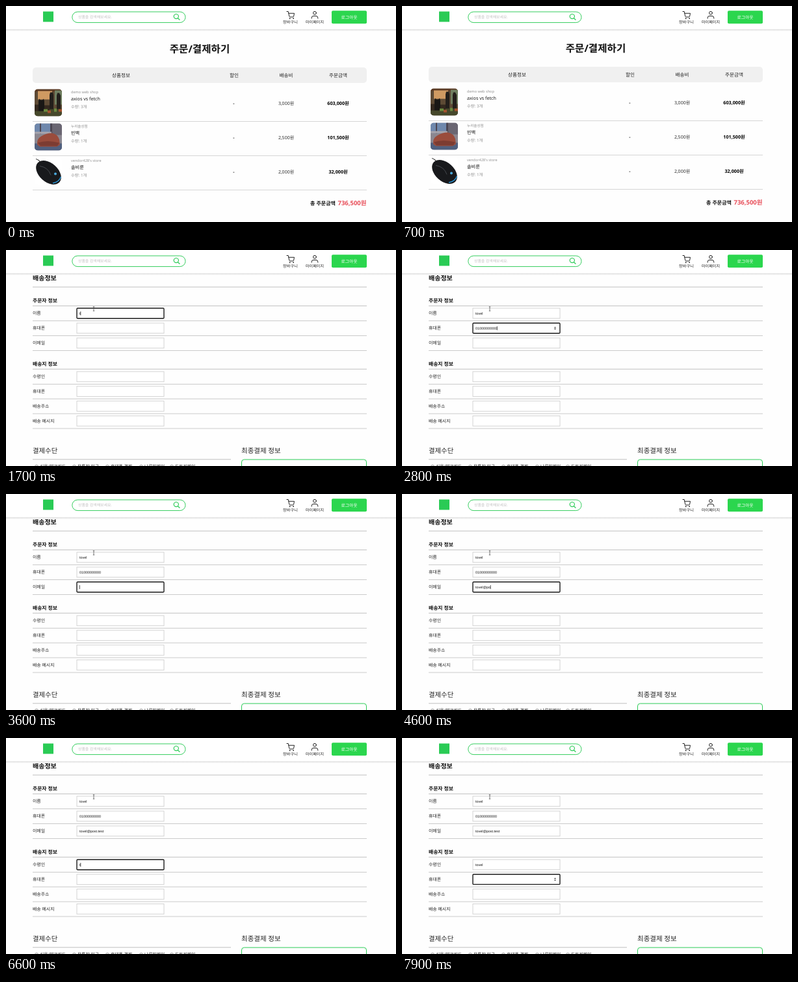
An HTML page that plays this animation: 600x334 px, repeating every 8 s.

```html
<!DOCTYPE html>
<html lang="ko">
<head>
<meta charset="utf-8">
<title>주문/결제하기</title>
<style>
  html, body { margin: 0; width: 100%; height: 100%; overflow: hidden; background: #fefefe; }
  svg { display: block; width: 600px; height: 334px; }
  text { font-family: "Open Sans", "Noto Sans CJK KR", "Noto Sans CJK", sans-serif; text-rendering: geometricPrecision; white-space: pre; }
  .typed { font-family: "Liberation Sans", Arial, sans-serif; }
  .icon { fill: none; stroke: #222; stroke-linecap: round; stroke-linejoin: round; }
</style>
</head>
<body>
<svg id="stage" viewBox="0 0 600 334"></svg>
<script>
const LOOP = 8000, SCROLL = 328;
const GREEN = '#2acb55';

// Markup helpers; y is the vertical middle of the glyphs.
const text = (x, y, str, size, { fill = '#222', weight = 400, anchor = 'start' } = {}) =>
  `<text x="${x}" y="${y + size * 0.36}" font-size="${size}" fill="${fill}" font-weight="${weight}" text-anchor="${anchor}">${str}</text>`;
const centered = (x, y, str, size, options = {}) => text(x, y, str, size, { ...options, anchor: 'middle' });
const rule = (y, width = 0.6, x2 = 555) =>
  `<path d="M41 ${y}H${x2}" stroke="#bdbdbd" stroke-width="${width}"/>`;

const products = [
  { store: 'demo web shop', name: 'axios vs fetch', count: 3, shipping: '3,000', price: '603,000' },
  { store: '누리솔상점', name: '빈백', count: 1, shipping: '2,500', price: '101,500' },
  { store: "vendor428's store", name: '솔비룬', count: 1, shipping: '2,000', price: '32,000' },
];

const thumbnails = [
  `<rect width="42" height="42" fill="#5d4a35"/>
   <path d="M0 0h42v4H0z" fill="#5b3a24"/>
   <path d="M5 3h22v13H5z" fill="#cf9a62"/>
   <path d="M31 2h11v22H31z" fill="#6f7f60"/>
   <path d="M0 30h42v12H0z" fill="#46482b"/>
   <path d="M6 34V19l1-4 2 2h3l2-2 1 4v15z" fill="#191715"/>
   <path d="M23 31V9l1-4h4l1 4v22zM34 31V10l1-4h3l2 4v21z" fill="#231f1b"/>
   <path d="M0 24h6v10H0zM15 25h8v8h-8z" fill="#33281e"/>
   <path d="M14 31h6v4h-6zM30 30h4v5h-4z" fill="#6b8a3e"/>
   <path d="M20 33h5v4h-5zM37 31h5v4h-5z" fill="#a5532f"/>`,
  `<rect width="42" height="42" fill="#8b8790"/>
   <path d="M0 0h26v16H0z" fill="#6f88ac"/>
   <path d="M26 0h16v18H26z" fill="#6a6672"/>
   <path d="M8 0h2v16H8zM24 0h3v18h-3z" fill="#4c4652"/>
   <path d="M0 13h26v3H0z" fill="#a9a5ac"/>
   <path d="M0 31h42v11H0z" fill="#50607f"/>
   <path d="M4 33q-1-9 6-13 8-5 16-5 9 1 12 10l1 8-5 3H8z" fill="#9a4c3c"/>
   <path d="M5 30q14-5 33 0l-3 5H9z" fill="#7c3c32"/>`,
  `<rect width="42" height="42" fill="#fff"/>
   <path d="M2 2q5 1 9 8" fill="none" stroke="#333" stroke-width="1.2"/>
   <ellipse cx="21.5" cy="23" rx="22.5" ry="14.5" transform="rotate(42 21.5 23)" fill="#18191c"/>
   <path d="M8 13q13 2 17 14" fill="none" stroke="#44474c"/>
   <path d="M28 39.5q10-2 12.5-10" fill="none" stroke="#2d9ee0" stroke-width="1.3"/>
   <circle cx="32" cy="25" r="2" fill="#4aa9dd"/>`,
];

const productRow = (product, i) => {
  const y = 150 + i * 53;
  const gray = { fill: '#8c8c8c' };
  return `<svg x="44" y="${y - 21.5}" width="42" height="42"><g clip-path="url(#thumb)">${thumbnails[i]}</g></svg>`
    + text(100, y - 17.5, product.store, 5.6, gray)
    + text(100, y - 6.6, product.name, 7.2, { fill: '#111' })
    + text(100, y + 5.4, `수량: ${product.count}개`, 6.3, gray)
    + centered(350.5, y, '-', 7, { weight: 700 })
    + centered(431, y, product.shipping + '원', 7)
    + centered(511, y, product.price + '원', 7.2, { weight: 700, fill: '#000' })
    + rule(y + 28.5);
};

// Form fields; keys start at `start`, one every `step` ms.
const fields = [
  { label: '이름', y: 98, value: 'tovel', focus: 1500, start: 1700, step: 90 },
  { label: '휴대폰', y: 121, value: '01000000000', focus: 2250, start: 2300, step: 42, numeric: true },
  { label: '이메일', y: 144, value: 'tovel@post.test', focus: 3200, start: 3700, step: 125 },
  { label: '수령인', y: 196, value: 'tovel', focus: 5850, start: 6580, step: 125 },
  { label: '휴대폰', y: 218.7, value: '', focus: 7380, start: 7380, step: 125, numeric: true },
  { label: '배송주소', y: 241.6, value: '', focus: Infinity },
  { label: '배송 메시지', y: 264.5, value: '', focus: Infinity },
];

const fieldRow = ({ label, y }) => `
  ${text(41, y, label, 6.9)}
  <g class="field">
    <rect class="box" x="109" y="${y - 8}" width="134" height="15.7"/>
    <text class="typed" x="113" y="${y + 2}" font-size="5.4" fill="#111"></text>
    <path class="caret" d="M0 ${y - 3}v6" stroke="#000" stroke-width=".7"/>
    <path class="spinner" d="M234 ${y - 0.6}l1.5-2 1.5 2zM234 ${y + 0.6}l1.5 2 1.5-2z" fill="#444"/>
  </g>
  ${rule(y + 11.5, 0.8)}`;

const payments = [[47, '신용/체크카드'], [105, '무통장 입금'], [156, '휴대폰 결제'], [208, '나루빛페이'], [255, '도토리페이']];
const bold = { weight: 700, fill: '#111' };

const orderTable = centered(298, 66.6, '주문/결제하기', 15.6, bold)
  + '<rect x="41" y="95" width="514" height="24" rx="5" fill="#f0f0f0"/>'
  + [[177, '상품정보'], [351, '할인'], [431, '배송비'], [511, '주문금액']]
      .map(([x, label]) => centered(x, 106.8, label, 7.6)).join('')
  + products.map(productRow).join('')
  + text(468, 305.2, '총 주문금액', 8, bold)
  + text(554.5, 305, '736,500원', 9.5, { weight: 700, fill: '#e8505b', anchor: 'end' });

const orderForm = text(41, 43.5, '배송정보', 10, bold) + rule(57.2, 0.95)
  + text(41, 78, '주문자 정보', 7.8, bold) + rule(86.4, 0.95)
  + text(41, 175.7, '배송지 정보', 7.8, bold) + rule(184.2, 0.95)
  + fields.map(fieldRow).join('')
  + text(41, 310.5, '결제수단', 10.4) + rule(323.8, 0.95, 346)
  + text(362, 310.5, '최종결제 정보', 10.5)
  + `<rect x="362.5" y="324" width="192" height="150" rx="4" fill="none" stroke="${GREEN}"/>`
  + payments.map(([x, label]) =>
      `<circle cx="${x}" cy="335" r="2.6" fill="#fff" stroke="#777" stroke-width=".7"/>` + text(x + 5, 335, label, 6.8)).join('');

const header = `
  <rect y="35" width="600" height="4" fill="url(#shadow)"/>
  <rect width="600" height="36" fill="#fff"/>
  <rect x="57" y="8.5" width="16" height="16" fill="${GREEN}"/>
  <rect x="101.8" y="9" width="174.2" height="16.6" rx="8.3" fill="#fff" stroke="${GREEN}" stroke-width=".95"/>
  ${text(111, 17, '상품을 검색해보세요.', 5.9, { fill: '#c0c0c0' })}
  <g class="icon" stroke-width="1.2">
    <path d="M264.4 18.8l2.6 2.5M258.2 16.1a3.6 3.6 0 1 1 7.2 0a3.6 3.6 0 1 1-7.2 0" style="stroke:${GREEN}"/>
  </g>
  <g class="icon" stroke-width="1">
    <path d="M432 8.5h2.2l1.6 7.4q.2 1.1 1.3 1.1h4.2q1 0 1.3-1l.9-4.7h-8.6"/>
    <circle cx="436.5" cy="19.2" r=".5"/><circle cx="442" cy="19.2" r=".5"/>
    <circle cx="475" cy="10.8" r="2.4"/>
    <path d="M470.2 19.3v-1a2.8 2.8 0 0 1 2.8-2.8h4a2.8 2.8 0 0 1 2.8 2.8v1"/>
  </g>
  ${centered(437.5, 24.5, '장바구니', 6.2)}
  ${centered(475, 24.5, '마이페이지', 6.1)}
  <rect x="501" y="7.2" width="54" height="20" rx="2" fill="#2bd64e"/>
  ${centered(528, 17.2, '로그아웃', 6.8, { fill: '#fff' })}`;

document.getElementById('stage').innerHTML = `
  <defs>
    <clipPath id="thumb"><rect width="42" height="42" rx="5"/></clipPath>
    <linearGradient id="shadow" x2="0" y2="1"><stop stop-color="#d0d0d0"/><stop offset="1" stop-color="#fefefe"/></linearGradient>
  </defs>
  <rect width="600" height="334" fill="#fefefe"/>
  <g id="page">${orderTable}<g transform="translate(0 ${SCROLL})">${orderForm}</g></g>
  ${header}
  <g id="pointer">
    <path id="arrow" d="M0 0v6.2l1.5-1.3 1 2.2 1-.5-1-2.1h1.9z" fill="#fff" stroke="#333" stroke-width=".6"/>
    <path id="beam" d="M-1.2-3.2h2.4M0-3.2v6.4M-1.2 3.2h2.4" fill="none" stroke="#444" stroke-width=".7"/>
  </g>`;

const byId = id => document.getElementById(id);
const page = byId('page'), pointer = byId('pointer'), arrow = byId('arrow'), beam = byId('beam');
document.querySelectorAll('.field').forEach((node, i) => {
  for (const part of ['box', 'typed', 'caret', 'spinner']) fields[i][part] = node.querySelector('.' + part);
});

const show = (node, visible) => node.setAttribute('visibility', visible ? 'visible' : 'hidden');
const ease = (t, from, to) => {
  const p = Math.min(1, Math.max(0, (t - from) / (to - from)));
  return p * p * p * (p * (6 * p - 15) + 10);
};

function drawField(field, t, focused) {
  const { value, start, step, box, typed, caret, spinner } = field;
  const count = t < start || !value ? 0 : Math.min(value.length, 1 + Math.floor((t - start) / step));
  const lastEvent = count ? start + (count - 1) * step : field.focus;
  typed.textContent = value.slice(0, count);
  box.setAttribute('fill', '#fff');
  box.setAttribute('rx', focused ? 1.2 : 0);
  box.setAttribute('stroke', focused ? '#191919' : '#cfcfcf');
  box.setAttribute('stroke-width', focused ? 1.4 : 0.9);
  show(caret, focused && (t - lastEvent) % 1000 < 500);
  show(spinner, focused && field.numeric);
  if (focused) caret.setAttribute('transform', `translate(${113.3 + (count && typed.getComputedTextLength())} 0)`);
}

function draw(t) {
  page.setAttribute('transform', `translate(0 ${-SCROLL * ease(t, 674, 1060)})`);

  const active = fields.filter(field => t >= field.focus).pop();
  fields.forEach(field => drawField(field, t, field === active));

  const move = ease(t, 1050, 1450);
  const x = 567.5 - 432.5 * move, y = 139 - 48 * move;
  const overInput = x < 243 && Math.abs(y - 98) < 8;
  pointer.setAttribute('transform', `translate(${x} ${y})`);
  show(arrow, t >= 950 && !overInput);
  show(beam, t >= 950 && overInput);
}

function tick() {
  draw(performance.now() % LOOP);
  requestAnimationFrame(tick);
}
tick();
</script>
</body>
</html>
```
